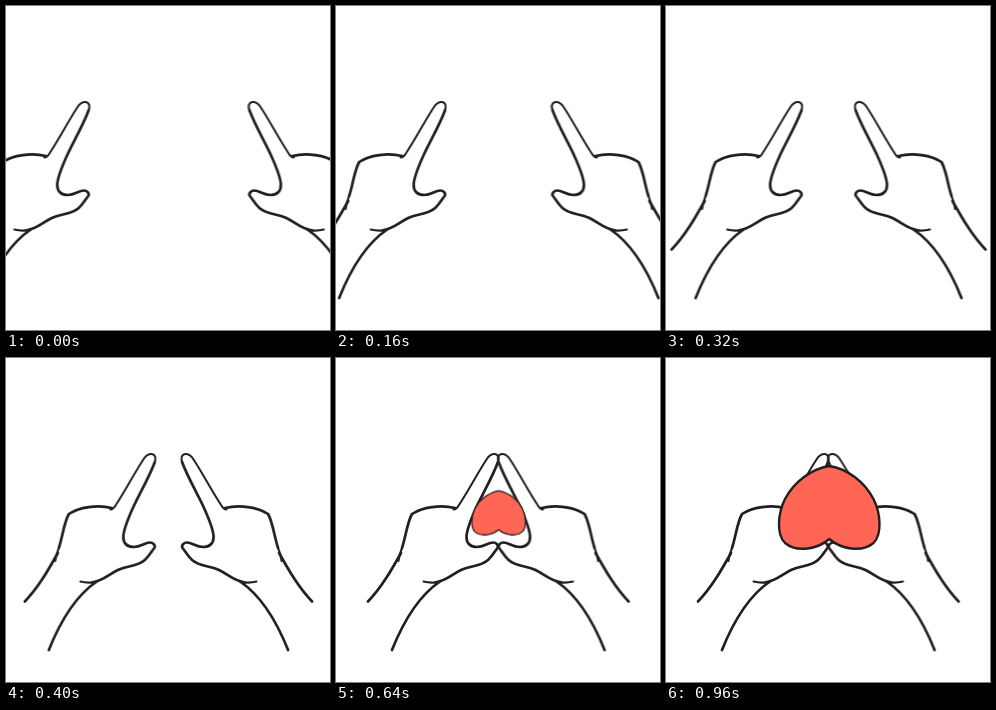
Write an HTML page without scripts that moves like this. It is 324x324 px and loops after 1.96 s.

```html
<!DOCTYPE html>
<html lang="en">
<head>
<meta charset="utf-8">
<title>Hands and heart</title>
<style>
  html, body { margin: 0; width: 100%; height: 100%; overflow: hidden; background: #fff; }
  svg { display: block; width: 100vw; height: 100vh; }

  .line { fill: none; stroke: #231f20; stroke-width: 2.7; stroke-linecap: round; stroke-linejoin: round; }
  .thin { stroke-width: 2; }

  .hand { animation: approach 1960ms infinite; }
  .left { --away: -79.3px; }
  .right { --away: -80.8px; }

  .heart {
    fill: #ff6655; stroke: #231f20; stroke-width: 2.4; stroke-linejoin: round;
    transform-origin: 161.8px 161px;
    animation: grow 1960ms infinite;
  }

  /* both moves advance every 80 ms */
  @keyframes approach {
    0% { transform: translateX(var(--away)); animation-timing-function: steps(6, end); }
    24.48%, 100% { transform: translateX(0); }
  }
  @keyframes grow {
    0% { transform: scale(0); animation-timing-function: step-end; }
    24.48% { transform: scale(.3); animation-timing-function: steps(6, end); }
    48.97%, 100% { transform: scale(1); }
  }
</style>
</head>
<body>
<svg viewBox="0 0 324 324">
  <defs>
    <g id="hand" class="line">
      <!-- index finger -->
      <path class="thin" d="M117.5 151.5 Q120.5 151.5 123 147 C133 132 141 116 150.5 101.500 C153 97.500 156 95.800 159 96 C162.500 96.500 163.300 100 162 104"/>
      <!-- palm and thumb -->
      <path d="M162 104 C156.500 119 147.500 134 140.500 149 C135.500 160 130.500 171 130.500 179 C130.500 186 135 189 141 189 C148 189 152 184.500 157 184.500 C160.500 184.500 163 187.500 161.500 190 C159 193 156.500 198 152 202 C144 209 136 207 125 212 C115 217 110 223 99 224.500"/>
      <path class="thin" d="M99 224.500 Q93 225 87.500 223.500"/>
      <!-- back of the hand -->
      <path d="M119 150 C105 146.500 86 149 76 156 C71 165 70 178 66 190"/>
      <path class="thin" d="M66 190 Q63 197 62.500 203"/>
      <!-- wrist -->
      <path d="M65 195 C56 211 46 229 32 243.500"/>
      <path d="M104 223.500 C82.500 238 68 262 56 292"/>
    </g>
  </defs>

  <g class="hand left"><use href="#hand"/></g>
  <g transform="translate(324.600 0) scale(-1 1)">
    <g class="hand right"><use href="#hand"/></g>
  </g>

  <path class="heart" d="M163.300 108 C145 111 128 124 119 141 C112 155 110 176 119 185 C131 195 152 191 163.300 181 C175 191 195.500 195 207.500 185 C216.500 176 214.500 155 207.500 141 C198.500 124 182 111 163.300 108 Z"/>
</svg>
</body>
</html>
```
